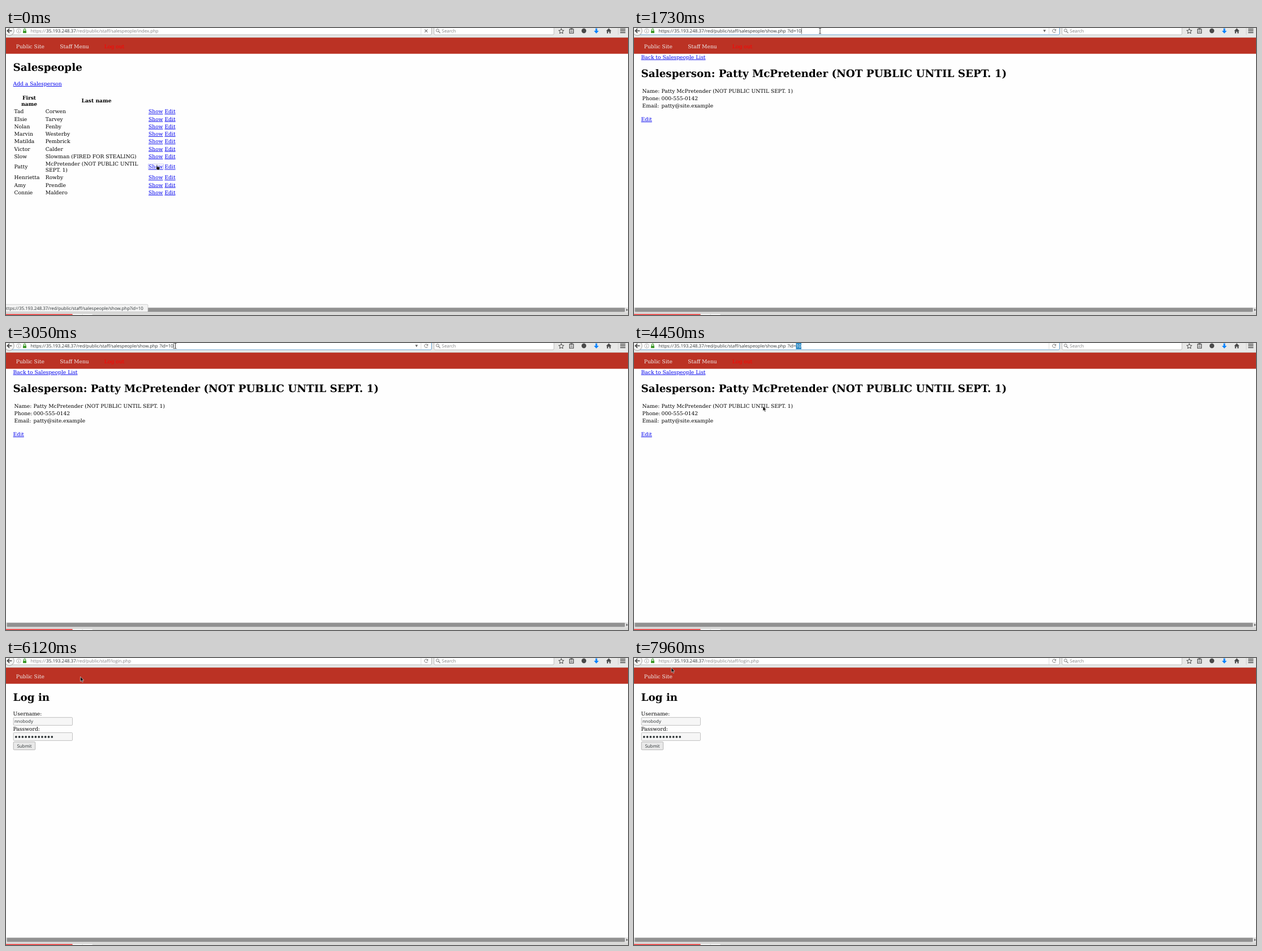
Write an HTML page that moves like this. It is 1100 px wide and 509 px high and loops after 8 s.

```html
<!DOCTYPE html>
<html lang="en">
<head>
<meta charset="utf-8">
<title>Staff pages</title>
<style>
html, body { margin: 0; width: 100%; height: 100%; overflow: hidden; background: #fefefe; }
svg { display: block; width: 1100px; height: 509px; text-rendering: geometricPrecision; }
text { white-space: pre; }
.page { font: 9.167px "DejaVu Serif", serif; }
.title { font-size: 18.33px; font-weight: bold; }
.th { font-weight: bold; text-anchor: middle; }
.link { fill: #00e; text-decoration: underline; text-decoration-skip-ink: none; }
.ui { font: 7.9px "Open Sans", sans-serif; fill: #2e3436; }
.dim { fill: #858585; }
.wide { font-size: 8.12px; }
.end { text-anchor: end; }
.field { fill: #f6f6f6; stroke: #aaa; stroke-width: .7; }
</style>
</head>
<body>
<svg id="stage" viewBox="0 0 1100 509"></svg>
<script>
const LOOP = 8000;
const HOST = '35.193.248.37';
const STAFF = '/red/public/staff/';
const SHOW = STAFF + 'salespeople/show.php';
const NOTE = '(NOT PUBLIC UNTIL SEPT. 1)';
const PERSON = 'Patty McPretender ' + NOTE;

const text = (x, y, s, cls = '', extra = '') =>
  `<text x="${x}" y="${y}" class="${cls}" ${extra}>${s}</text>`;
const rect = (x, y, w, h, fill, extra = '') =>
  `<rect x="${x}" y="${y}" width="${w}" height="${h}" fill="${fill}" ${extra}/>`;
const path = (d, fill, extra = '') => `<path d="${d}" fill="${fill}" ${extra}/>`;
const group = (id, body, cls = '') => `<g id="${id}" class="${cls}">${body}</g>`;
const outline = (color, width = 1) => `stroke="${color}" stroke-width="${width}"`;

const people = [
  ['Tad', 'Corwen'], ['Elsie', 'Tarvey'], ['Nolan', 'Fenby'], ['Marvin', 'Westerby'],
  ['Matilda', 'Pembrick'], ['Victor', 'Calder'], ['Slow', 'Slowman (FIRED FOR STEALING)'],
  ['Patty', 'McPretender (NOT PUBLIC UNTIL', 'SEPT. 1)'],
  ['Henrietta', 'Rowby'], ['Amy', 'Prendle'], ['Connie', 'Maldero']
];

function peopleRows() {
  let y = 151.3;
  return people.map(([first, last, more]) => {
    if (more) y += 5.4;
    const row = text(14.6, y, first) +
      (more ? text(69.8, y - 5.5, last) + text(69.8, y + 5.4, more) : text(69.8, y, last)) +
      text(252, y, 'Show', 'link') + text(280.5, y, 'Edit', 'link');
    y += more ? 18.9 : 13.25;
    return row;
  }).join('');
}

const listPage =
  text(12.6, 76.4, 'Salespeople', 'title') +
  text(12.6, 102, 'Add a Salesperson', 'link') +
  text(41, 126.5, 'First', 'th') + text(41, 137.6, 'name', 'th') + text(160, 132, 'Last name', 'th') +
  peopleRows() +
  rect(251.7, 241.2, 26.8, 9.9, 'none', outline('#6a6aee', .6) + ' stroke-dasharray="1 .6"');

const showPage =
  text(12.6, 54.8, 'Back to Salespeople List', 'link') +
  text(12.6, 87.3, 'Salesperson: ' + PERSON, 'title') +
  [['Name:', PERSON], ['Phone:', '000-555-0142'], ['Email:', 'patty@site.example']]
    .map(([label, value], i) =>
      text(14.6, 114.9 + i * 13.25, label) + text(48.6, 114.9 + i * 13.25, value)).join('') +
  text(12.6, 165, 'Edit', 'link');

const dots = Array.from({ length: 12 }, (_, i) =>
  `<circle cx="${17.8 + i * 5.77}" cy="139.9" r="1.85" fill="#2e3436"/>`).join('');
const loginPage =
  text(12.6, 76.4, 'Log in', 'title') +
  text(12.6, 102, 'Username:') + text(12.6, 129.2, 'Password:') +
  [105.4, 132.4].map(y => rect(13.2, y, 104.3, 14, '', 'class="field" rx="1.2"')).join('') +
  text(15, 115.4, 'nnobody', 'ui') + dots +
  rect(13.2, 148.8, 38.5, 14, '#e9e9e9', 'rx="1.2" ' + outline('#999', .7)) +
  text(32.5, 158.6, 'Submit', 'ui', 'text-anchor="middle"');

const toolbar =
  rect(0, 0, 1100, 17, '#e8e8e7') + rect(0, 16, 1100, 1, '#cfcfcd') +
  rect(5, -8, 747.5, 20, '#fff', 'rx="2" id="urlBox" stroke-width=".9"') +
  `<circle cx="6" cy="5" r="8.3" fill="#f3f3f2" ${outline('#999', .9)}/>` +
  path('M10.3 5H2.5M6 1.4L2.4 5L6 8.6', 'none', outline('#444', 1.7)) +
  `<circle cx="22.5" cy="5.2" r="3.8" fill="none" ${outline('#999', .7)}/>` +
  path('M22.5 4.5V7.4M22.5 2.8V3.7', 'none', outline('#888', .9)) +
  rect(30, 4.8, 6, 4.3, '#3f9b2c', 'rx=".6"') +
  path('M31.2 5V3.4A1.8 1.8 0 0 1 34.8 3.4V5', 'none', outline('#3f9b2c', 1.1)) +
  text(43.5, 8, 'https://', 'ui', 'id="scheme"') +
  text(71, 8, HOST, 'ui wide') +
  text(124, 8, '', 'ui', 'id="urlPath"') + text(296, 8, '', 'ui wide end', 'id="query"') +
  group('selection', rect(0, 0, 0, 11, '#308cc6', 'id="selBox"') +
    text(296, 8, '', 'ui wide end', 'id="selText" style="fill:#fff"')) +
  group('caret', rect(295.9, .5, .7, 10, '#222')) +
  group('drop', path('M723.7 3.2H728.3L726 7.6Z', '#666')) +
  rect(733.6, 0, .7, 12, '#ccc') +
  group('reload', path('M745.4 3.2A3 3 0 1 0 745.8 6.4', 'none', outline('#777', 1)) +
    path('M746.4 1.6V4.8H743.2Z', '#777')) +
  group('stop', path('M740.5 2.7L745.5 7.7M745.5 2.7L740.5 7.7', 'none', outline('#777', 1.2))) +
  rect(757, -8, 212, 20, '#fff', 'rx="2" ' + outline('#b3b3b1', .8)) +
  `<circle cx="763.2" cy="4.3" r="2.5" fill="none" ${outline('#777', .9)}/>` +
  path('M765 6.2L768 9.2', 'none', outline('#777', 1.1)) +
  text(770.8, 8, 'Search', 'ui dim') +
  path('M982 .9L983.3 4L986.6 4.3L984.1 6.5L984.9 9.7L982 8L979.1 9.7L979.9 6.5L977.4 4.3L980.7 4Z',
    'none', outline('#444', 1)) +
  rect(996.6, 2, 7, 7.2, '#f1f1f1', outline('#444', 1.1)) + rect(998.2, .6, 3.8, 2, '#444') +
  path('M998 4.8H1002.3M998 6.9H1002.3', 'none', outline('#444', .8)) +
  '<circle cx="1022" cy="5" r="4.2" fill="#4a4a4a"/>' +
  path('M1042.5 .7H1045.5V5H1048.3L1044 9.8L1039.7 5H1042.5Z', '#0a84ff') +
  path('M1066 .6L1061.3 5.2H1062.7V9.5H1064.9V6.5H1067.1V9.5H1069.3V5.2H1070.7Z', '#4a4a4a') +
  rect(1082.5, 0, .7, 12, '#c5c5c5') +
  path('M1086.2 2H1095.4M1086.2 5.1H1095.4M1086.2 8.2H1095.4', 'none', outline('#444', 1.5));

const bottomBar =
  rect(0, 495.5, 1100, 8.7, '#e3e3e3') + rect(1.5, 496.2, 1093, 7.3, '#919191', 'rx="1"') +
  path('M1097 497.6V502.2L1099.6 499.9Z', '#555') +
  rect(0, 504.2, 1100, 5, '#d9d9d8') + rect(0, 507.3, 117.5, 1.7, '#ef4444') +
  rect(118, 507.6, 16.7, 1.4, '#fff') + rect(135.6, 507.6, 17, 1.4, '#fff');

const cursors =
  group('arrow', path('M0 0V8.6L2 6.8L3.4 10L4.9 9.3L3.5 6.3H6.1Z', '#111', outline('#fff', .55))) +
  group('hand', path('M1.3 .2H2.6V3.5L6.7 4.3V7.2L5.9 9.4H2.6L.1 5.9L.8 5.2L1.3 5.6Z', '#111', outline('#fff', .5))) +
  group('beam', path('M-2 .4H-.5L0 .8L.5 .4H2M0 .8V9.4M-2 9.8H-.5L0 9.4L.5 9.8H2', 'none', outline('#222', .9)));

const $ = id => document.getElementById(id);
$('stage').innerHTML =
  rect(0, 0, 1100, 509, '#fefefe') + toolbar +
  group('nav', rect(0, 17.1, 1100, 28.6, '#bb3224') +
    text(17.8, 35.7, 'Public Site', '', 'fill="#eee"') +
    group('staffNav', text(95.3, 35.7, 'Staff Menu', '', 'fill="#eee"') +
      text(173.8, 35.7, 'Log out', '', 'fill="#f00"')), 'page') +
  group('list', listPage, 'page') + group('show', showPage, 'page') + group('login', loginPage, 'page') +
  bottomBar +
  group('status', rect(-4, 490.3, 0, 13.3, '#f3f3f3', 'id="statusBox" rx="1.5" ' + outline('#bbb', .7)) +
    text(-4, 499.6, '', 'ui', 'id="statusText"')) +
  cursors;

const site = p => 'https://' + HOST + p;
// Each step changes only the listed parts of the browser state.
const steps = [
  [0, { page: 'list', url: STAFF + 'salespeople/index.php', query: '', loading: true, focus: false,
    drop: false, caret: false, sel: null, status: [site(SHOW + '?id=10'), 251] }],
  [120, { url: SHOW, query: '?id=10', status: ['Transferring data from ' + HOST + '…', 146] }],
  [270, { page: 'show', loading: false, status: null }],
  [1460, { drop: true }],
  [1610, { focus: true, caret: true }],
  [2620, { sel: [43.5, site(SHOW + '?id=10')], caret: false }],
  [2740, { sel: null, caret: true }],
  [3540, { sel: [291.2, '0'], caret: false }],
  [3690, { sel: [286.4, '10'] }],
  [3970, { drop: false }],
  [5450, { status: [site(STAFF + 'logout.php'), 181.5] }],
  [5570, { focus: false, sel: null, loading: true }],
  [6120, { page: 'login', url: STAFF + 'login.php', query: '', loading: false, status: null }],
  [6940, { status: [site('/red/public/index.php'), 158] }],
  [7330, { status: null }]
];

const moves = [
  [0, 'hand', 265, 242.3], [120, 'arrow', 266, 244], [550, 'arrow', 265.7, 243],
  [800, 'arrow', 263, 222], [920, 'arrow', 257, 175], [1040, 'arrow', 253, 129],
  [1190, 'arrow', 283, 70], [1310, 'arrow', 321, 9], [1460, 'beam', 329, 0],
  [2350, 'beam', 320, 0], [2470, 'beam', 311.5, 0], [2620, 'beam', 296, 0], [2740, 'beam', 281, 0],
  [3050, 'beam', 299.5, 0], [3170, 'beam', 302, 0], [3420, 'beam', 298, 0], [3540, 'beam', 293.5, 0],
  [3690, 'beam', 288.5, 0], [3970, 'arrow', 280, 22], [4090, 'arrow', 263, 62], [4210, 'arrow', 246, 102],
  [4330, 'arrow', 235, 120], [4450, 'arrow', 228, 112], [4570, 'arrow', 224, 93], [4690, 'arrow', 221, 72],
  [4810, 'arrow', 216, 62], [4930, 'arrow', 210, 51], [5050, 'arrow', 203, 42], [5170, 'hand', 198.8, 34.2],
  [5970, 'hand', 171.8, 34.6], [6120, 'arrow', 131.5, 33], [6240, 'arrow', 103, 30],
  [6520, 'arrow', 80, 29], [6640, 'hand', 58, 35.5], [6790, 'hand', 44.5, 36],
  [7060, 'arrow', 50, 80], [7180, 'arrow', 55, 133], [7330, 'arrow', 60, 149],
  [7480, 'arrow', 58, 141], [7600, 'arrow', 54, 111], [7720, 'arrow', 53, 76],
  [7840, 'hand', 59, 40], [7960, 'arrow', 66, 17]
];

const visible = (id, on) => { $(id).style.display = on ? '' : 'none'; };

function drawBrowser(s) {
  for (const page of ['list', 'show', 'login']) visible(page, s.page === page);
  visible('staffNav', s.page !== 'login');
  visible('stop', s.loading);
  visible('reload', !s.loading);
  visible('drop', s.drop);
  visible('caret', s.caret);
  $('urlPath').textContent = s.url;
  $('query').textContent = s.query;
  for (const id of ['scheme', 'urlPath', 'query']) $(id).classList.toggle('dim', !s.focus);
  $('urlBox').setAttribute('stroke', s.focus ? '#5b9bcf' : '#b3b3b1');
  visible('selection', s.sel);
  if (s.sel) {
    $('selBox').setAttribute('x', s.sel[0]);
    $('selBox').setAttribute('width', 296 - s.sel[0]);
    $('selText').textContent = s.sel[1];
  }
  visible('status', s.status);
  if (s.status) {
    $('statusText').textContent = s.status[0];
    $('statusBox').setAttribute('width', s.status[1] + 4);
  }
}

function drawCursor([, kind, x, y]) {
  for (const id of ['arrow', 'hand', 'beam']) visible(id, id === kind);
  $(kind).setAttribute('transform', `translate(${x} ${y})`);
}

function render(now) {
  const t = now % LOOP;
  drawBrowser(Object.assign({}, ...steps.filter(s => s[0] <= t).map(s => s[1])));
  drawCursor(moves.filter(m => m[0] <= t).pop());
}

const start = performance.now();
function tick() {
  render(performance.now() - start);
  requestAnimationFrame(tick);
}
tick();
</script>
</body>
</html>
```
